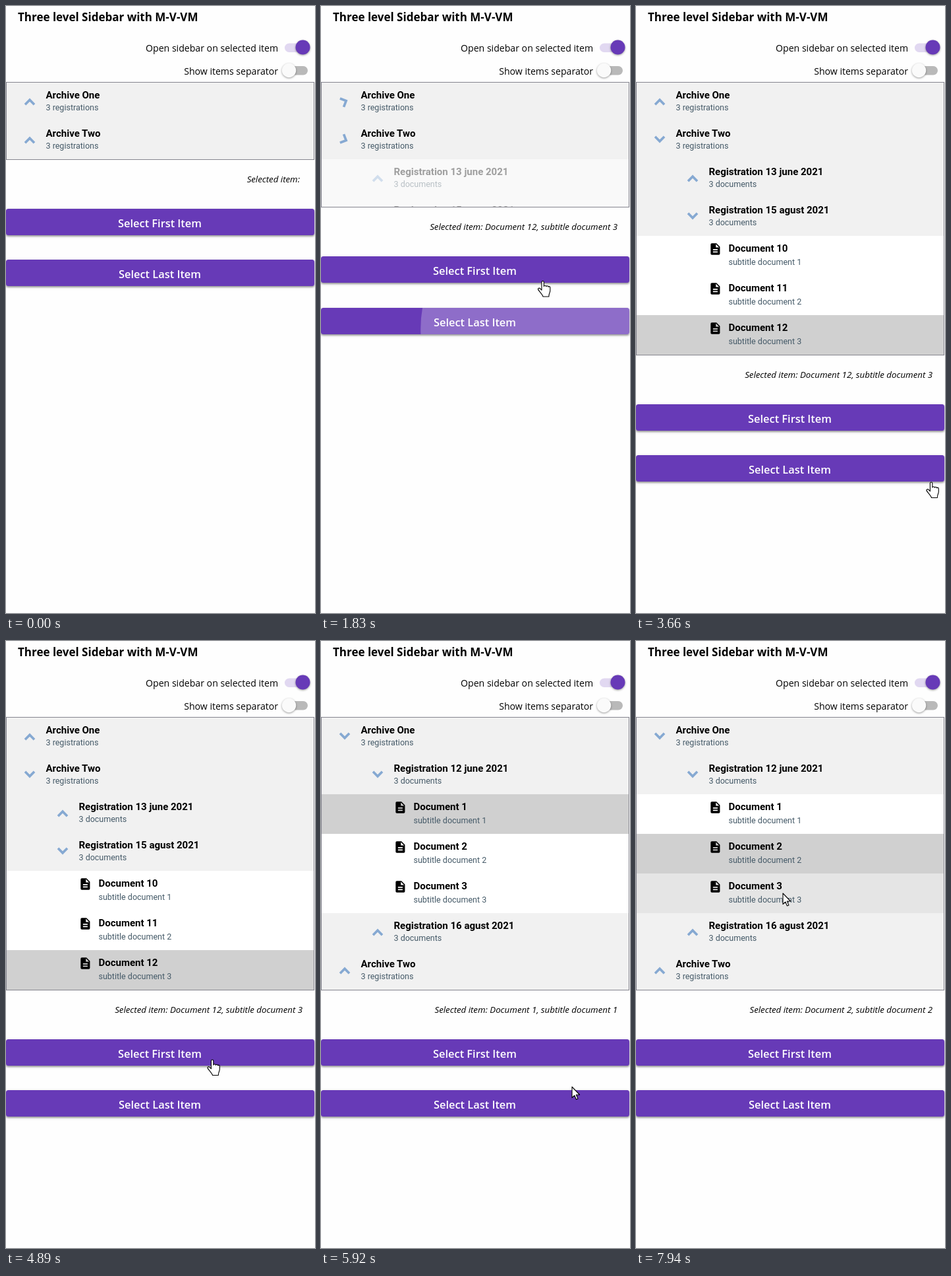
These frames come from a looping animation (469x919 px, 8000 ms). An HTML page:

```html
<!DOCTYPE html>
<html lang="en">
<head>
<meta charset="utf-8">
<title>Three level Sidebar</title>
<style>
html, body { margin: 0; width: 100%; height: 100%; overflow: hidden; background: #fefefe; }
#stage { display: block; width: 469px; height: 919px; }
text { font-family: Roboto, sans-serif; }
.ui { font-family: "Open Sans", "Noto Sans", sans-serif; }
.head { font-size: 17px; font-weight: 700; }
.label { font-size: 14.1px; text-anchor: end; }
.chosen { font-size: 13.3px; font-style: italic; text-anchor: end; }
.cta { font-size: 16.4px; font-weight: 600; fill: #fff; text-anchor: middle; }
.name { font-size: 15px; font-weight: 700; }
.sub { font-size: 12.5px; fill: #455a68; }
.arrow { fill: none; stroke: #86a9d2; stroke-width: 3.7; }
.btn { fill: #673ab7; filter: drop-shadow(0 2px 1px rgba(0,0,0,.3)) drop-shadow(0 1px 2px rgba(0,0,0,.16)); }
.thumb { filter: drop-shadow(0 1px 1.5px rgba(0,0,0,.4)); }
.cursor { fill: #fff; stroke: #000; stroke-width: 1.1; stroke-linejoin: round; }
</style>
</head>
<body>
<svg id="stage" viewBox="0 0 469 919">
  <rect width="469" height="919" fill="#fefefe"/>
  <text class="ui head" x="18" y="22.5">Three level Sidebar with M-V-VM</text>
  <text class="ui label" x="413" y="69">Open sidebar on selected item</text>
  <rect x="423" y="56.5" width="36" height="13.5" rx="6.75" fill="#e1d8f1"/>
  <circle class="thumb" cx="450.5" cy="62.5" r="11" fill="#673ab7"/>
  <text class="ui label" x="413" y="104">Show items separator</text>
  <rect x="422" y="91" width="36" height="13.5" rx="6.75" fill="#b9b9b9"/>
  <circle class="thumb" cx="429.5" cy="97.5" r="10.7" fill="#fafafa"/>
  <g id="live"></g>
</svg>
<script>
const LOOP = 8000, ROW = 58, DOC = 60, BODY = 2 * ROW + 3 * DOC;
const OPEN_TWO = 1710, OPEN_ONE = 4940, PICK = 6970;
const live = document.getElementById('live');

// Screen updates: [first, last, count]
const updates = [
  [290, 1070, 11], [1150, 1280, 3], [1540, 1540, 1], [1830, 2620, 11],
  [2710, 3020, 5], [3660, 4130, 7], [4280, 4280, 1], [4890, 5060, 3],
  [5060, 5670, 9], [5750, 5920, 3], [5920, 6540, 9], [6630, 7010, 6],
  [7010, 7410, 6], [7480, 7710, 4], [7940, 7940, 1]
];

// Pointer path: [time, x, y]
const path = [
  [290, 466, 486], [1070, 345, 412], [1280, 336.5, 416.5], [2150, 336.5, 416.5],
  [2620, 380, 482], [2690, 380, 482], [3020, 444, 686], [3660, 448, 721],
  [4130, 313, 634], [5300, 313, 634], [5670, 330, 690], [5920, 381, 675],
  [6540, 250, 372], [6630, 250, 372], [6940, 229, 342], [7480, 229, 342],
  [7710, 224, 349], [7940, 223, 382]
];

const clamp = v => Math.min(1, Math.max(0, v));

function bezier(x1, y1, x2, y2) {
  const at = (a, b, s) => 3 * (1 - s) * (1 - s) * s * a + 3 * (1 - s) * s * s * b + s * s * s;
  return v => {
    const x = clamp(v);
    let lo = 0, hi = 1;
    for (let i = 0; i < 24; i++) {
      const mid = (lo + hi) / 2;
      if (at(x1, x2, mid) < x) lo = mid; else hi = mid;
    }
    return x === 0 || x === 1 ? x : at(y1, y2, lo);
  };
}
const easeIn = bezier(.42, 0, 1, 1);
const easeOut = bezier(0, 0, .58, 1);
const standard = bezier(.4, 0, .2, 1);
const decelerate = bezier(0, 0, .2, 1);

function snap(t) {
  let last = 0;
  for (const [a, b, n] of updates) {
    if (t < a) break;
    const step = n > 1 ? (b - a) / (n - 1) : 0;
    last = step ? Math.min(b, a + Math.floor((t - a) / step + .001) * step) : a;
  }
  return last;
}

function pointer(t) {
  let i = 0;
  while (i < path.length - 2 && t >= path[i + 1][0]) i++;
  const [ta, xa, ya] = path[i], [tb, xb, yb] = path[i + 1];
  const k = clamp((t - ta) / (tb - ta));
  return { x: xa + (xb - xa) * k, y: ya + (yb - ya) * k };
}

const lines = (x, y, name, sub, gap) =>
  `<text class="name" x="${x}" y="${y + 24}">${name}</text>
   <text class="sub" x="${x}" y="${y + gap}">${sub}</text>`;

function folder(indent, y, name, sub, angle) {
  return `<rect y="${y}" width="468" height="${ROW}" fill="#f1f1f1"/>
    <path class="arrow" d="M-7 4.7L0-2.3 7 4.7" transform="translate(${36 + indent} ${y + 28.5}) rotate(${angle})"/>`
    + lines(60.5 + indent, y, name, sub, 42);
}

function doc(y, num, part, shade, extra = '') {
  return `<rect y="${y}" width="468" height="${DOC}" fill="rgb(${shade},${shade},${shade})"/>${extra}
    <path d="M14 2H6a2 2 0 0 0-2 2V20a2 2 0 0 0 2 2H18a2 2 0 0 0 2-2V8zM16 18H8v-2h8zM16 14H8v-2h8zM13 9V3.5L18.5 9z"
      transform="translate(109.8 ${y + 9.5}) scale(.88)"/>`
    + lines(140.5, y, 'Document ' + num, 'subtitle document ' + part, 44);
}

// A clipped box that also fades its content
const pane = (y, h, fade, inner) => h <= 0 ? '' :
  `<g opacity="${fade}"><svg y="${y}" width="468" height="${h}">${inner}</svg></g>`;

function ripple(t, start, fadeAt, end, x, y, h, size, tint, alpha) {
  if (t < start || t >= end) return '';
  const r = size * decelerate((t - start) / 450);
  const a = alpha * (1 - clamp((t - fadeAt) / (end - fadeAt)));
  return pane(y, h, a, `<circle cx="${x}" cy="${h === DOC ? 50 : 32}" r="${r}" fill="${tint}"/>`);
}

function button(y, label, wave) {
  return `<rect class="btn" y="${y}" width="468" height="40" rx="3.5"/>${wave}
    <text class="ui cta" x="233.5" y="${y + 27.5}">${label}</text>`;
}

function chosen(t) {
  if (t < OPEN_TWO) return '';
  const [n, part] = t < OPEN_ONE ? [12, 3] : t < PICK ? [1, 1] : [2, 2];
  return ` Document ${n}, subtitle document ${part}`;
}

function draw(t) {
  const second = t >= OPEN_ONE;
  const since = t - (second ? OPEN_ONE : OPEN_TWO);
  const one = second ? easeIn(since / 278.3) : 0;
  const two = second ? 1 - easeOut(since / 325) : easeIn(since / 278.3);
  const turn = 180 * standard(since / 293), back = 180 - turn;
  const opening = second ? back : turn;
  const fadeOne = one ** .7, fadeTwo = two ** .7;
  const p = pointer(t);

  // Layout is fractional; what is drawn sits on whole pixels
  const bottom = 116 + 2 * ROW + BODY * (one + two);
  const yTwo = Math.round(116 + ROW + BODY * one);
  const end = Math.round(bottom);
  const first = Math.round(bottom + 74.7), last = Math.round(bottom + 152.3);

  const over = (top, open) => open === 1 && p.y >= top && p.y < top + DOC;
  const shade = (top, open, picked) => {
    const rest = over(top, open) ? 229 : 255;
    return Math.round(rest + (208 - rest) * picked);
  };
  const moved = clamp((t - PICK) / 130);

  const docsOne = [1 - moved, moved, 0].map((picked, i) => {
    const y = i * DOC;
    const wave = i === 1 ? ripple(t, 6962, 7150, 7410, 229, y, DOC, 241, '#000', .25) : '';
    return doc(y, i + 1, i + 1, shade(232 + y, one, picked), wave);
  }).join('');
  const docsTwo = [0, 0, 1].map((picked, i) =>
    doc(i * DOC, 10 + i, i + 1, shade(348 + i * DOC, two, picked))).join('');

  const bodyOne = folder(50, 0, 'Registration 12 june 2021', '3 documents', turn)
    + pane(ROW, 3 * DOC, fadeOne, docsOne)
    + folder(50, ROW + 3 * DOC, 'Registration 16 agust 2021', '3 documents', 0);
  const bodyTwo = folder(50, 0, 'Registration 13 june 2021', '3 documents', second ? back : 0)
    + folder(50, ROW, 'Registration 15 agust 2021', '3 documents', opening)
    + pane(2 * ROW, 3 * DOC, fadeTwo, docsTwo);

  const angleOne = second ? turn : t < OPEN_TWO ? 0 : back;
  let out = folder(0, 116, 'Archive One', '3 registrations', angleOne)
    + pane(116 + ROW, yTwo - 116 - ROW, fadeOne, bodyOne)
    + folder(0, yTwo, 'Archive Two', '3 registrations', opening)
    + pane(yTwo + ROW, end - yTwo - ROW, fadeTwo, bodyTwo)
    + `<rect x=".5" y="115.5" width="467" height="${end - 115}" fill="none" stroke="#85858f"/>`;

  const pick = chosen(t);
  out += `<text class="ui chosen" x="${pick ? 450 : 446}" y="${end + 35}">Selected item:${pick}</text>`
    + button(first, 'Select First Item', ripple(t, 4942, 5340, 5670, 313, first, 40, 315, '#fff', .26))
    + button(last, 'Select Last Item', ripple(t, 1726, 2176, 2610, 337, last, 40, 338, '#fff', .26));

  if (t >= 290) {
    const settling = t > OPEN_ONE && t < OPEN_ONE + 360;
    const hand = !settling && [first, last].some(y => p.y >= y && p.y < y + 42);
    const shape = hand
      ? 'M-1.6 13.7V1.7a1.7 1.7 0 0 1 3.4 0V8q.2-1.3 1.8-1.3 1.7 0 1.7 1.5.3-1 1.6-1 1.6 0 1.6 1.6.3-.7 1.2-.7 1.6 0 1.6 1.7v4.7c0 3-2 4-2 9H.5C-.5 20-6.5 14.5-7 12.5c-.4-1.8 2-2.4 3.2-1.1z'
      : 'M0 0V16.5L3.8 13 6.4 19 8.9 17.9 6.3 12H11.6Z';
    out += `<path class="cursor" d="${shape}" transform="translate(${p.x} ${p.y})"/>`;
  }
  live.innerHTML = out;
}

let shown = -1;
function tick(now) {
  const t = snap(now % LOOP);
  if (t !== shown) draw(shown = t);
  requestAnimationFrame(tick);
}
tick(performance.now());
</script>
</body>
</html>
```
